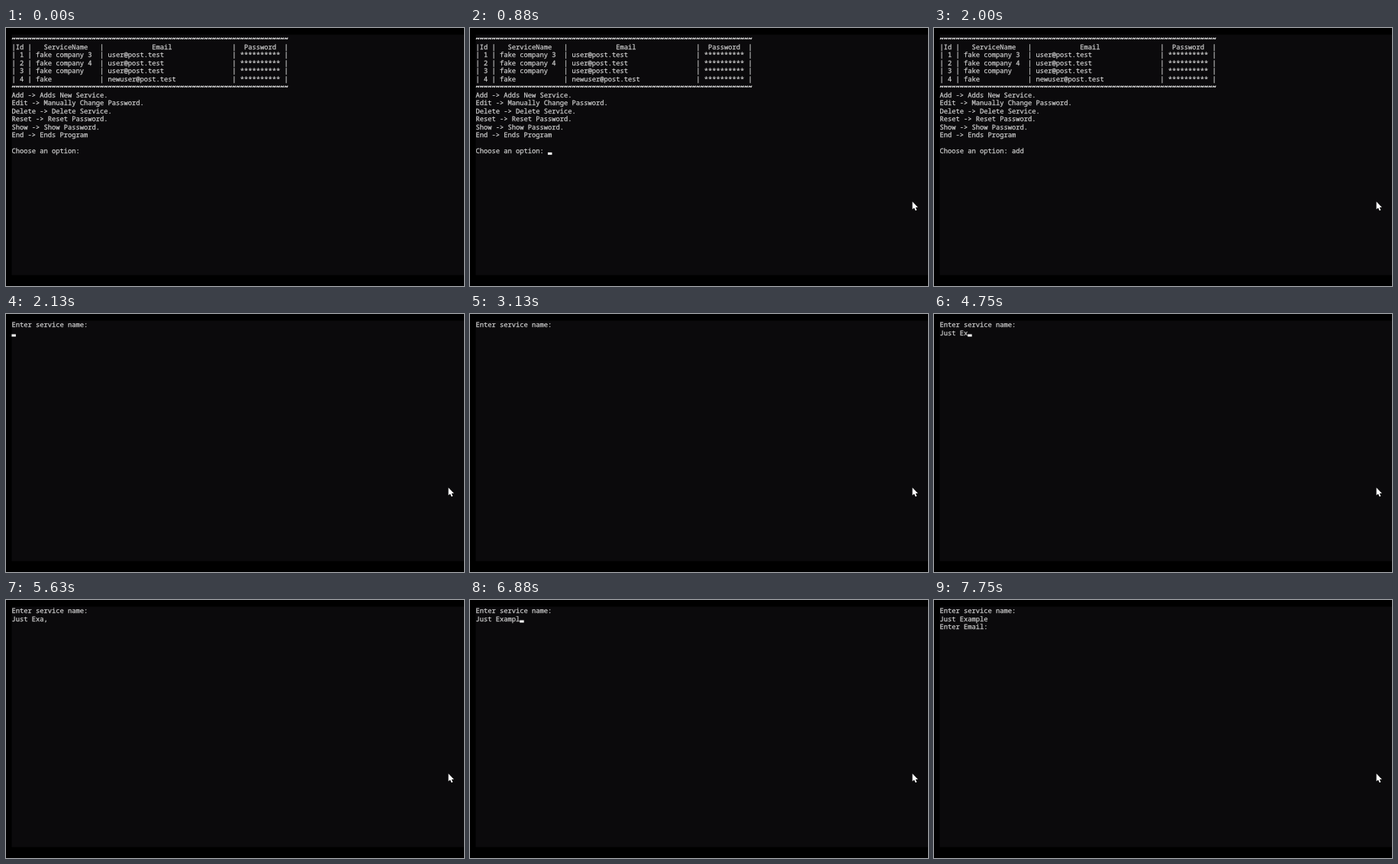
Write an HTML page that moves like this. It is 600 px wide and 338 px high and loops after 8000 ms.

```html
<!DOCTYPE html>
<html lang="en">
<head>
<meta charset="utf-8">
<title>Password manager console</title>
<style>
  html, body { margin: 0; height: 100%; overflow: hidden; background: #000; }
  svg { display: block; width: 100vw; height: 100vh; }
  text {
    font: 8.753px "Noto Sans Mono", "DejaVu Sans Mono", monospace;
    fill: #ccc;
    stroke: #ccc;
    stroke-width: .25px;
    white-space: pre;
    text-rendering: geometricPrecision;
  }
  .rule { stroke-width: .8px; }
</style>
</head>
<body>
<svg viewBox="0 0 600 338">
  <rect x="7.5" y="8.7" width="592.5" height="315" fill="#0b0a0c"/>
  <g id="lines"></g>
  <rect id="caret" width="5.5" height="3.1" fill="#f2f2f2"/>
  <path id="mouse" d="M0 0V10.2L2.3 8.1L4 11.8L5.7 11L4.1 7.5H7.2Z" fill="#fff"/>
</svg>
<script>
const LOOP = 8000, LEFT = 7.4, TOP = 8.7, COL = 5.252, ROW = 10.5;
const $ = id => document.getElementById(id);

const rule = "~".repeat(69);
const entry = (id, name, email) =>
  `| ${id} | ${name.padEnd(16)}| ${email.padEnd(31)}| ${"*".repeat(10)} |`;

const menu = [
  rule,
  "|Id |   ServiceName   |" + " ".repeat(12) + "Email" + " ".repeat(15) + "|  Password  |",
  entry(1, "fake company 3", "user@post.test"),
  entry(2, "fake company 4", "user@post.test"),
  entry(3, "fake company", "user@post.test"),
  entry(4, "fake", "newuser@post.test"),
  rule,
  "Add -> Adds New Service.",
  "Edit -> Manually Change Password.",
  "Delete -> Delete Service.",
  "Reset -> Reset Password.",
  "Show -> Show Password.",
  "End -> Ends Program",
  "",
  "Choose an option: "
].join("\n");
const ask = "Enter service name:\n";
const done = ask + "Just Example\nEnter Email:\n";

// [start ms, fixed text, typed text, caret visible]
const steps = [
  [0, menu, "", false],
  [880, menu, "", true],
  [1130, menu, "a", true],
  [1250, menu, "ad", true],
  [1380, menu, "add", true],
  [2000, menu, "add", false],
  [2130, ask, "", true],
  [3000, ask, "", false],
  [3500, ask, "", true],
  [3880, ask, "J", true],
  [4000, ask, "Ju", true],
  [4130, ask, "Jus", true],
  [4250, ask, "Just ", true],
  [4500, ask, "Just ", false],
  [4630, ask, "Just E", true],
  [4750, ask, "Just Ex", true],
  [4880, ask, "Just Exa", true],
  [5130, ask, "Just Exam", false],
  [5380, ask, "Just Exa", true],
  [5630, ask, "Just Exa,", false],
  [6000, ask, "Just Exa", true],
  [6250, ask, "Just Exa", false],
  [6630, ask, "Just Exam", true],
  [6750, ask, "Just Examp", true],
  [6880, ask, "Just Exampl", true],
  [7000, ask, "Just Example", true],
  [7130, ask, "Just Example", false],
  [7250, done, "", true],
  [7750, done, "", false]
];

const lines = Array.from({ length: 15 }, (_, i) => {
  const line = document.createElementNS("http://www.w3.org/2000/svg", "text");
  line.setAttribute("x", LEFT);
  line.setAttribute("y", TOP + 8.5 + i * ROW);
  return $("lines").appendChild(line);
});

function place(el, x, y, visible) {
  el.setAttribute("transform", `translate(${x} ${y})`);
  el.setAttribute("visibility", visible ? "visible" : "hidden");
}

let shown;
function draw(t) {
  place($("mouse"), t < 500 ? 575.7 : 579.6, t < 500 ? 226.9 : 227.4, t >= 380);

  const step = steps.findLast(s => s[0] <= t);
  if (step === shown) return;
  shown = step;
  const [, fixed, typed, caret] = step;
  const rows = (fixed + typed).split("\n");
  lines.forEach((line, i) => {
    line.textContent = rows[i] || "";
    line.classList.toggle("rule", rows[i] === rule);
  });
  const last = rows.length - 1;
  place($("caret"), LEFT + rows[last].length * COL, TOP + last * ROW + 7.3, caret);
}

const start = performance.now();
function tick() {
  draw((performance.now() - start) % LOOP);
  requestAnimationFrame(tick);
}
tick();
</script>
</body>
</html>
```
